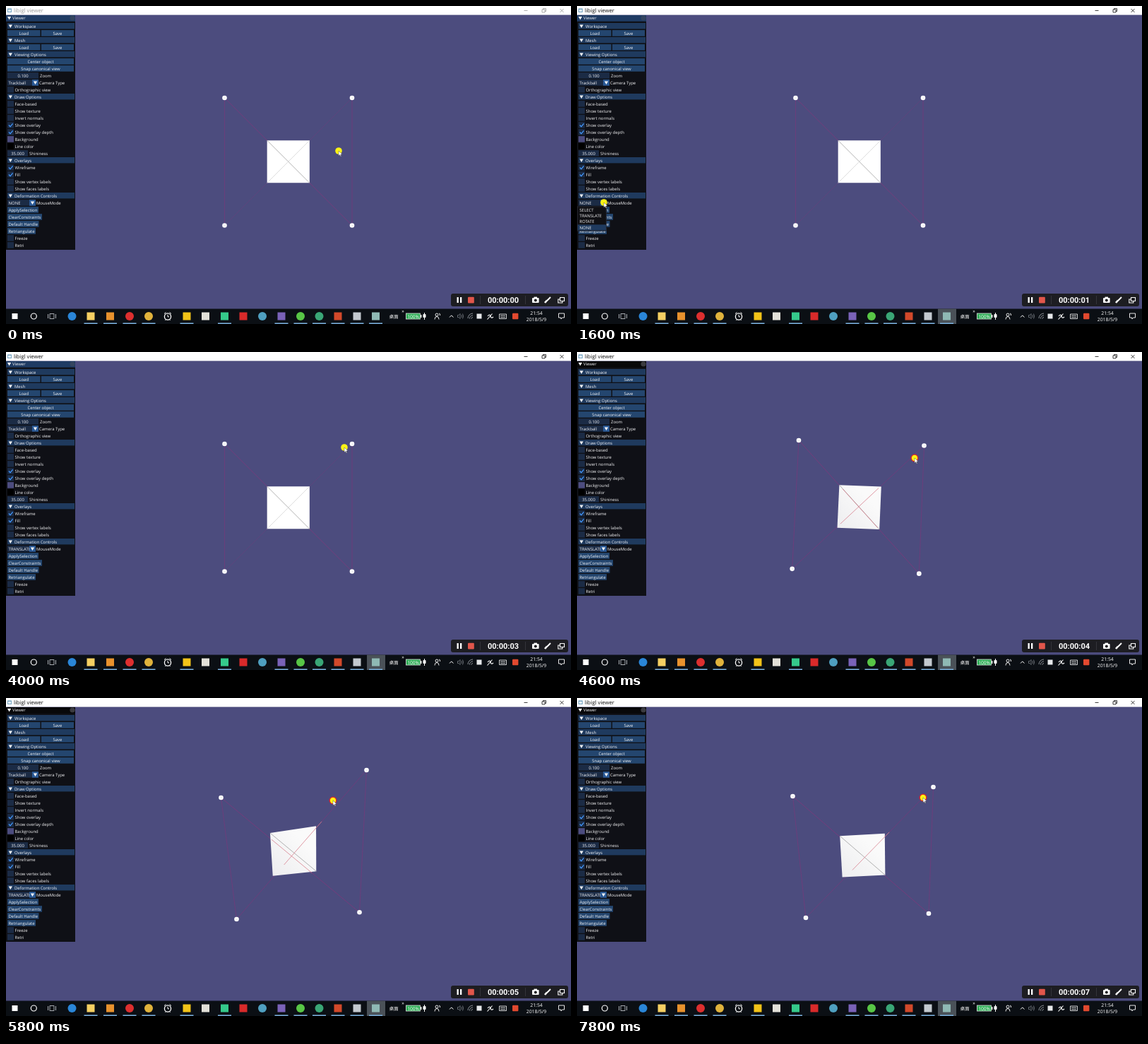
These frames come from a looping animation (800 by 450 pixels, 8 s). An HTML page:

```html
<!DOCTYPE html>
<html lang="en">
<head>
<meta charset="utf-8">
<title>Mesh viewer</title>
<style>
html, body { margin: 0; width: 100%; height: 100%; overflow: hidden; background: #4c4c7e; }
svg { display: block; width: 100vw; height: 100vh; }
text { font-family: "Open Sans", "Noto Sans", sans-serif; text-rendering: geometricPrecision; white-space: pre; }
.ui text { font-size: 5.95px; fill: #f4f4f6; }
.timer { font: bold 11px Roboto, sans-serif; fill: #fff; }
.cjk { font-family: "Noto Sans CJK SC", "Noto Sans CJK", sans-serif; }
</style>
</head>
<body>
<svg id="stage" viewBox="0 0 800 450"></svg>
<script>
const LOOP = 8000, STEP = 200;
const ACTIVATE = 1200, CHOOSE = 2400, PRESS = 4400;
const HEADER = '#1f3a5e', BUTTON = '#24466f', FRAME = '#1b2b45', ARROW = '#2b5a96';

const rect = (x, y, w, h, fill, more = '') =>
  `<rect x="${x}" y="${y}" width="${w}" height="${h}" fill="${fill}" ${more}/>`;
const disc = (x, y, r, fill, more = '') => `<circle cx="${x}" cy="${y}" r="${r}" fill="${fill}" ${more}/>`;
const path = (d, stroke, width = 1, more = '') =>
  `<path d="${d}" fill="none" stroke="${stroke}" stroke-width="${width}" ${more}/>`;
const label = (x, y, s, more = '') => `<text x="${x}" y="${y}" ${more}>${s}</text>`;
const centred = (x, y, s, more = '') => label(x, y, s, `text-anchor="middle" ${more}`);
const down = (x, y, w = 2.6) =>
  `<path d="M${x - w} ${y - 2}h${2 * w}L${x} ${y + 2.4}z" fill="#fff"/>`;

// Rows of the control panel; y is the middle of the row.
const header = s => y => rect(2, y - 4.5, 95, 8.4, HEADER) + down(6.3, y) + label(12, y + 2.1, s);
const button = (s, x, w) => y => rect(x, y - 4.4, w, 8.6, BUTTON) + centred(x + w / 2, y + 2.1, s);
const pair = y => button('Load', 2, 46.5)(y) + button('Save', 50, 46)(y);
const slider = (v, s, w) => y =>
  rect(2, y - 4.4, w, 8.6, FRAME) + centred(2 + w / 2, y + 2.1, v) + label(4 + w, y + 2.1, s);
const check = (s, on) => y => rect(2, y - 4.4, 9, 8.6, FRAME) +
  (on ? path(`M4 ${y}l2 2.3l3.6 -4.4`, '#4296fa', 1.3) : '') + label(12.5, y + 2.1, s);
const swatch = (s, c) => y => rect(2, y - 4.4, 9, 8.6, c) + label(12.5, y + 2.1, s);
const combo = (v, s, w, id) => y => rect(2, y - 4.4, w, 8.6, FRAME) +
  label(3.6, y + 2.1, v, id ? `id="${id}"` : '') +
  rect(w - 7, y - 4.4, 9, 8.6, ARROW) + down(w - 2.5, y) + label(w + 3, y + 2.1, s);

const rows = [
  header('Workspace'), pair, header('Mesh'), pair,
  header('Viewing Options'), button('Center object', 2, 94), button('Snap canonical view', 2, 94),
  slider('0.100', 'Zoom', 44), combo('Trackball', 'Camera Type', 44), check('Orthographic view'),
  header('Draw Options'), check('Face-based'), check('Show texture'), check('Invert normals'),
  check('Show overlay', 1), check('Show overlay depth', 1),
  swatch('Background', '#4c4c7e'), swatch('Line color', '#000'), slider('35.000', 'Shininess', 29),
  header('Overlays'), check('Wireframe', 1), check('Fill', 1),
  check('Show vertex labels'), check('Show faces labels'),
  header('Deformation Controls'), combo('NONE', 'MouseMode', 40, 'mode'),
  button('ApplySelection', 2, 44), button('ClearConstraints', 2, 49),
  button('Default Handle', 2, 44.5), button('Retriangulate', 2, 40),
  check('Freeze'), check('Retri')
];

const modes = ['SELECT', 'TRANSLATE', 'ROTATE', 'NONE'];
const modeY = i => 289 + 8.15 * i;

const panel = () => `<g class="ui">` +
  rect(0, 13, 98, 332, '#0f1016') + rect(0, 13, 98, 8.8, '#1f3b63', 'id="bar"') +
  down(4.6, 17) + label(9, 19.2, 'Viewer') + disc(94, 17, 3.6, '#3d4450', 'id="close"') +
  rows.map((row, i) => row(28.5 + 10 * i)).join('') +
  `<g id="menu">` + rect(.5, 284, 41, 34.2, '#101014', 'stroke="#2c2c36" stroke-width=".6"') +
  rect(1, 0, 40, 8.2, HEADER, 'id="pick"') +
  modes.map((m, i) => label(3.6, modeY(i) + 2.1, m)).join('') + `</g></g>`;

const titleBar = () => rect(0, 0, 800, 12.6, '#fff') +
  rect(2, 3.5, 6, 5.5, '#7aa7c4') + rect(3, 5, 4, 3, '#e8f2f7') +
  `<g id="title">` + label(11, 9, 'libigl viewer', 'font-size="7.65" fill="currentColor"') +
  path('M733.5 6.5h5M759 5h4v4h-4zM760.5 5v-1.4h4v4h-1.4M784.5 4l5 5M789.5 4l-5 5', 'currentColor', .8) + `</g>`;

const recorder = () => rect(630, 407, 166, 18, '#1d1d22', 'rx="3"') +
  rect(638.5, 412, 2.3, 8, '#fff') + rect(643, 412, 2.3, 8, '#fff') +
  rect(654, 411.8, 8.8, 8.6, '#e2564b', 'rx="1"') +
  path('M671.5 410v12M735.5 410v12', '#3a3a40', .8) +
  centred(704, 420, '', 'class="timer" id="timer"') +
  rect(745, 413, 9.6, 7, '#fff', 'rx="1"') + rect(747.5, 411.6, 4.5, 2, '#fff') + disc(749.8, 416.4, 2, '#1d1d22') +
  path('M771 412l-5 5', '#fff', 2) + path('M766 416.5l-3 3.5', '#fff', 2.6) +
  path('M784.5 412.5h6v5h-6zM784 415h-2.2v5h6v-2', '#fff', 1.1);

// Taskbar apps: centre x, colour, round?, running?
const apps = [
  [93.5, '#2a86d8', 1, 0], [120, '#f5cf62', 0, 1], [147.5, '#e8922d', 0, 1], [175, '#dd2f2f', 1, 1],
  [202, '#e0b33c', 1, 1], [256, '#f2c318', 0, 1], [282.5, '#e2e0d8', 0, 0], [309.5, '#35c98b', 0, 1],
  [336, '#d92a2a', 0, 0], [363, '#4f9fc0', 1, 0], [390, '#7a62b8', 0, 1], [417, '#58c646', 1, 1],
  [443.5, '#3aa676', 1, 1], [470, '#d2492a', 0, 1], [497, '#c3c9cf', 0, 1], [523.5, '#8fb9b4', 0, 1]
];

const taskbar = () => rect(0, 428.5, 800, 21.5, '#0b0f14') +
  rect(511, 428.5, 26, 21.5, '#4a5158', 'id="active"') +
  rect(8.5, 435, 8, 8, '#fff') + disc(39.3, 439, 4, 'none', 'stroke="#fff" stroke-width="1.2"') +
  path('M62 435.5h6v7h-6zM59.5 436v6M70.5 436v6', '#b9bdc2', .9) +
  apps.map(([x, c, round, open]) =>
    (round ? disc(x, 439, 6, c) : rect(x - 5.5, 433.5, 11, 11, c)) +
    (open ? rect(x - 9.5, 448.4, 19, 1.6, '#76a9d4') : '')).join('') +
  disc(229, 439.5, 4.6, 'none', 'stroke="#fff" stroke-width="1.3"') +
  path('M229 436.8v3h2M224 435.5l2.5 -2M234 435.5l-2.5 -2M225.5 444.8l1 -1.4M232.5 444.8l-1 -1.4', '#fff') +
  centred(549, 441.5, '桌面', 'class="cjk" font-size="6.6" fill="#fff"') +
  centred(562, 434, '»', 'font-size="7" fill="#fff"') +
  rect(566.5, 435, 20, 8, '#2fae57', 'stroke="#dfe5e0" stroke-width=".8"') + rect(587, 437, 1.5, 4, '#dfe5e0') +
  centred(576.5, 441.6, '100%', 'font-size="6.6" fill="#fff"') +
  path('M592.5 434v2M592.5 441v3', '#fff', 1) + rect(590.5, 436, 4, 5, '#fff', 'rx="1"') +
  disc(610, 437, 2, 'none', 'stroke="#fff" stroke-width=".9"') +
  path('M607 443.5q0 -4 3 -4t3 4M613 435q2 0 1.5 3', '#fff', .9) +
  path('M628 440.5l2.7 -2.7l2.7 2.7', '#fff', 1) +
  path('M639.5 437.5h1.5l2 -2v7l-2 -2h-1.5zM645 437q1.4 2 0 4M646.5 435.5q2.4 3.5 0 7', '#7d8288', .8) +
  path('M654 442a7 7 0 0 1 7 -7M656.3 442.5a4.7 4.7 0 0 1 4.7 -4.7M658.8 442.7a2.2 2.2 0 0 1 2.2 -2.2', '#8d9298', 1) +
  rect(666.5, 435.5, 7, 7, '#e6e8ea') +
  path('M681.5 443.5l7 -8M682 439q3 -4 4 0t4 1', '#fff', 1.1) +
  path('M698.5 436h10v6.5h-10zM700 438.2h7M700 440.6h7', '#fff', .8) +
  rect(717, 434.8, 8.4, 8.4, '#e2492f', 'rx="1"') +
  centred(751, 436.8, '21:54', 'font-size="6.8" fill="#fff"') +
  centred(751, 446.4, '2018/5/9', 'font-size="6.8" fill="#fff"') +
  path('M782.5 435h8v6h-3l-1.6 2v-2h-3.4z', '#fff', .9);

const scene = () => `<g id="mesh">` +
  path('', '#8c2f78', .8, 'id="sides" opacity=".62"') +
  path('', '#93307a', .8, 'id="fall" opacity=".7"') +
  path('', '#8c2f78', .8, 'id="rise"') +
  `<path id="quad"/>` +
  path('', '#a9a9a9', .9, 'id="diag"') + path('', '#d6d6d6', .8, 'id="cross"') +
  path('', '#d8808f', .8, 'id="redFall"') + path('', '#d8808f', .8, 'id="redRise"') +
  [0, 1, 2, 3].map(i => `<g id="knob${i}">` + disc(0, 0, 3.3, '#fff') + disc(.3, .2, .8, '#d9d9de') + `</g>`).join('') +
  `</g>`;

const pointer = () => `<g id="pointer">` + disc(0, 0, 4.8, '#fbf315', 'id="halo"') +
  `<path d="M0 0v7.2l1.7 -1.6l1.1 2.4l1.1 -.5l-1.1 -2.4h2.3z" fill="#fff" stroke="#333" stroke-width=".4"/></g>`;

document.getElementById('stage').innerHTML =
  `<defs><linearGradient id="shade" x1="0" y1="1" x2="1" y2="0">
    <stop offset="0" stop-color="#ededef"/><stop offset=".7" stop-color="#fafafa"/></linearGradient></defs>` +
  rect(0, 0, 800, 450, '#4c4c7e') + scene() + panel() + titleBar() + recorder() + taskbar() + pointer();

const el = {};
document.querySelectorAll('[id]').forEach(e => el[e.id] = e);
const set = (id, name, value) => el[id].setAttribute(name, value);
const show = (id, on) => set(id, 'display', on ? 'inline' : 'none');

// Pointer path: time, x, y.
const moves = [
  [0, 471, 205], [200, 455, 208], [800, 150, 262], [1200, 38, 278], [1600, 38, 278],
  [2000, 24, 297], [2400, 22, 297], [2800, 90, 265], [3600, 430, 160], [4000, 479, 135],
  [4200, 476, 145], [4600, 478, 150], [4800, 507, 158], [5000, 590, 106], [5200, 588, 100],
  [5400, 550, 112], [5600, 496, 117], [5800, 463, 145], [6200, 455, 160], [6600, 480, 140],
  [7000, 523, 107], [7400, 595, 84], [7600, 565, 100], [7800, 490, 141]
];
// Free handles: time, top left, bottom right, bottom left, drift of the inner quad.
const poses = [
  [4400, 309.5, 130, 490, 310.5, 309.5, 310.5, 0, 0],
  [5000, 323, 115, 473, 320, 295, 299.5, 3.3, .3],
  [5800, 304.5, 141, 500.5, 303.3, 326.5, 313, -3, 2.5],
  [7000, 305.5, 139, 498, 305, 324, 311, -3.5, 2.5],
  [7800, 305.5, 139, 498, 305, 324, 311, -3, 2.5]
];

function sample(keys, t) {
  const i = keys.findIndex(k => k[0] > t);
  if (i < 1) return (i ? keys[keys.length - 1] : keys[0]).slice(1);
  const a = keys[i - 1], b = keys[i], u = (t - a[0]) / (b[0] - a[0]);
  return a.slice(1).map((v, j) => v + (b[j + 1] - v) * u);
}

const line = (a, b) => `M${a}L${b}`;

function drawMesh(t) {
  const drag = t > PRESS;
  const p = sample(poses, t);
  // The held handle follows the pointer, late at first.
  const [hx, hy] = sample(moves, t < 6200 ? t - STEP : t);
  const held = drag ? [hx + 14.5, hy - 15] : [490, 130];
  const c = [[p[0], p[1]], held, [p[2], p[3]], [p[4], p[5]]];
  const q = c.map((v, i) => [0, 1].map(k =>
    (4 * v[k] + 2 * c[(i + 1) % 4][k] + 2 * c[(i + 3) % 4][k] + c[(i + 2) % 4][k]) / 9 + p[6 + k]));

  c.forEach((v, i) => set('knob' + i, 'transform', `translate(${v})`));
  set('sides', 'd', line(c[0], c[3]) + line(c[1], c[2]));
  set('fall', 'd', line(c[0], c[2]));
  set('rise', 'd', line(c[3], c[1]));
  set('rise', 'opacity', drag ? .62 : .32);
  set('quad', 'd', `M${q.join('L')}z`);
  set('quad', 'fill', drag ? 'url(#shade)' : '#fff');
  set('diag', 'd', line(q[0], q[2]));
  set('cross', 'd', line(q[3], q[1]));
  show('cross', !drag);

  // Overlay lines seen through the quad.
  const inside = (a, b) => line(a.map((v, k) => v + (b[k] - v) * .365), a.map((v, k) => v + (b[k] - v) * .655));
  set('redFall', 'd', inside(c[0], c[2]));
  set('redRise', 'd', inside(c[3], c[1]));
  show('redFall', drag && t < 7600);
  show('redRise', drag && (t < 6600 || t > 7400));
}

function draw(time) {
  let t = Math.floor(time % LOOP / STEP) * STEP;
  const active = t >= ACTIVATE, focused = t < PRESS;
  drawMesh(t);

  const [x, y] = sample(moves, t);
  set('pointer', 'transform', `translate(${x} ${y})`);
  set('halo', 'stroke', focused ? 'none' : '#e0222a');
  set('halo', 'stroke-width', 1.3);

  show('menu', active && t < CHOOSE);
  const hover = y < 284 ? 3 : Math.min(3, Math.max(0, Math.round((y - 289) / 8.15)));
  set('pick', 'y', modeY(hover) - 4.1);
  el.mode.textContent = t < CHOOSE ? 'NONE' : 'TRANSLATE';

  set('title', 'color', active ? '#111' : '#999');
  show('active', active);
  set('bar', 'fill', focused ? '#1f3b63' : '#08080a');
  set('close', 'fill', focused ? '#34455f' : '#3b3b40');
  el.timer.textContent = '00:00:0' + Math.max(0, Math.floor((t - 400) / 1000));
}

function tick() {
  draw(performance.now());
  requestAnimationFrame(tick);
}
tick();
</script>
</body>
</html>
```
